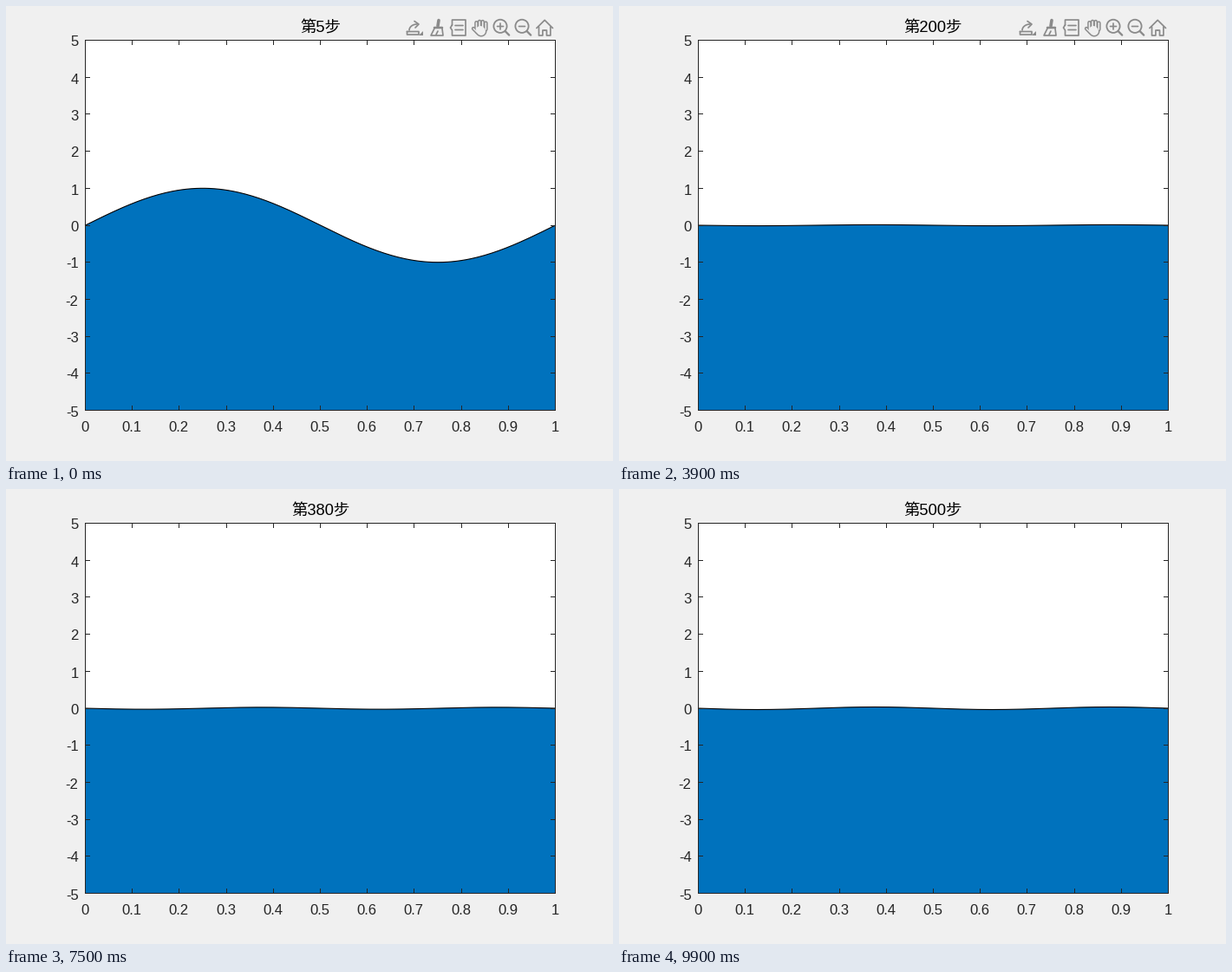
These frames come from a looping animation (700 by 525 pixels, 10 s). A matplotlib script:

```python
import numpy as np
import matplotlib.pyplot as plt
from matplotlib.animation import FuncAnimation
from matplotlib.patches import Circle, Polygon, Rectangle

W, H, DPI = 700, 525, 100
LEFT, RIGHT, TOP, BOTTOM = 91.5, 633.5, 39.5, 466.5
FRAMES, INTERVAL, STEP = 100, 100, 5
TOOLBAR_END = 68
DRIFT = 7e-5  # growth of the second harmonic per step
PX = 72 / DPI
BACK, INK, TOOL, BLUE = "#F0F0F0", "#262626", "#8A8A8A", "#0072BD"

plt.rcParams["font.family"] = ["Liberation Sans", "Noto Sans CJK JP"]
fig = plt.figure(figsize=(W / DPI, H / DPI), dpi=DPI, facecolor=BACK)
ax = fig.add_axes([0, 0, 1, 1])
ax.set_xlim(0, W)
ax.set_ylim(H, 0)
ax.axis("off")


def px(u):
    return LEFT + (RIGHT - LEFT) * u


def py(v):
    return BOTTOM - (BOTTOM - TOP) * (v + 5) / 10


def center(c):
    """Middle of the pixel that holds c, so thin lines stay crisp."""
    return np.floor(c) + 0.5


def line(xs, ys, color=INK, width=1.0, z=4, **kw):
    return ax.plot(xs, ys, color=color, lw=width * PX, zorder=z,
                   snap=False, **kw)[0]


def label(x, y, text, size=16.67, color=INK, ha="center"):
    return ax.text(x, y, text, fontsize=size * PX, color=color, ha=ha,
                   va="baseline", zorder=5)


def draw_axes():
    ax.add_patch(Rectangle((LEFT, TOP), RIGHT - LEFT, BOTTOM - TOP,
                           fc="white", ec="none", snap=False, zorder=1))
    for y in (TOP, BOTTOM):
        line([LEFT, RIGHT], [y, y], solid_capstyle="projecting")
    for x in (LEFT, RIGHT):
        line([x, x], [TOP, BOTTOM], solid_capstyle="projecting")
    for i in range(11):
        x, y = center(px(i / 10)), center(py(i - 5))
        for end, d in ((TOP, 5.5), (BOTTOM, -5.5)):
            line([x, x], [end, end + d], solid_capstyle="butt")
        for end, d in ((LEFT, 5.5), (RIGHT, -5.5)):
            line([end, end + d], [y, y], solid_capstyle="butt")
        label(x - 0.5, 491, f"{i / 10:g}")
        label(83.5, y + 7, str(i - 5), ha="right")


def stroke(*pts, width=1.7, color=TOOL, z=6):
    xs, ys = zip(*pts)
    return line(xs, ys, color, width, z, solid_joinstyle="round",
                solid_capstyle="round")


def frame(x0, y0, x1, y1):
    return stroke((x0, y0), (x1, y0), (x1, y1), (x0, y1), (x0, y0))


def outlined(a, b, width):
    """Capsule outline; overlapping capsules merge into one shape."""
    return [stroke(a, b, width=width),
            stroke(a, b, width=width - 3, color=BACK, z=7)]


def export_icon(x):
    t = np.linspace(0, np.pi / 2, 12)
    arc = zip(x - 6 + 9 * (1 - np.cos(t)), 28 - 7 * np.sin(t))
    corner = Polygon([(x + 10, 29), (x + 10, 34), (x + 5, 34)],
                     fc=TOOL, ec="none", zorder=6)
    return [stroke(*arc), frame(x - 8.5, 29.5, x + 5, 33),
            stroke((x, 17.5), (x + 5, 21), (x + 1, 25)),
            ax.add_patch(corner)]


def brush_icon(x):
    return [stroke((x + 1, 16.5), (x, 23), width=3.6),
            stroke((x - 4, 25), (x + 5, 25), width=2.6),
            stroke((x - 4, 26), (x - 8, 34), (x + 6, 34), (x + 5, 26)),
            stroke((x - 2, 33), (x, 29))]


def tip_icon(x):
    lines = [stroke((x - 4, y), (x + 5, y)) for y in (22.5, 27.5)]
    box = stroke((x - 7.5, 22), (x - 7.5, 16), (x + 8, 16), (x + 8, 34),
                 (x - 7.5, 34), (x - 7.5, 28), (x - 9.5, 25), (x - 7.5, 22))
    return [box, *lines]


def hand_icon(x):
    parts = outlined((x, 28), (x + 1, 29), 13)
    parts += outlined((x - 8, 26), (x - 4, 30), 4.4)
    for i in range(4):
        fx = x - 4.5 + 3.6 * i
        parts += outlined((fx, 17.8 + 0.7 * (i - 1.4) ** 2), (fx, 27), 4.6)
    return parts


def zoom_icon(x, plus):
    ring = Circle((x, 23.3), 7.6, fill=False, ec=TOOL, lw=1.8 * PX, zorder=6)
    parts = [ax.add_patch(ring),
             stroke((x + 5.6, 29), (x + 10.2, 33.6), width=2.3),
             stroke((x - 3.5, 23.5), (x + 3.5, 23.5))]
    if plus:
        parts.append(stroke((x, 20), (x, 27)))
    return parts


def home_icon(x):
    parts = [stroke((x - 9.3, 25.5), (x, 16.3), (x + 9.3, 25.5))]
    for side in (-1, 1):
        parts.append(stroke((x + 6.7 * side, 24), (x + 6.7 * side, 34),
                            (x + 2.3 * side, 34), (x + 2.3 * side, 28),
                            (x, 28)))
    return parts


draw_axes()
tools = (export_icon(471) + brush_icon(498) + tip_icon(522) + hand_icon(547)
         + zoom_icon(570, True) + zoom_icon(595, False) + home_icon(621.2))
title = label(362.5, 31, "", 18.33, "black")
u = np.linspace(0, 1, 201)
xs = px(u)
water = ax.add_patch(Polygon([(0, 0), (1, 1)], fc=BLUE, ec="none",
                             snap=False, zorder=2))
surface = line([], [], "black", 1.1, 3)


def wave(n):
    """Standing wave whose second harmonic slowly falls out of phase."""
    first = np.sin(np.pi * n / 10) * np.sin(2 * np.pi * u)
    second = -DRIFT * n * np.cos(np.pi * n / 5) * np.sin(4 * np.pi * u)
    return first + second


def update(k):
    n = STEP * (k + 1)
    ys = py(wave(n))
    water.set_xy([(LEFT, BOTTOM), *zip(xs, ys), (RIGHT, BOTTOM)])
    surface.set_data(xs, ys)
    title.set_text(f"第{n}步")
    for part in tools:
        part.set_visible(k < TOOLBAR_END)
    return [water, surface, title, *tools]


anim = FuncAnimation(fig, update, frames=FRAMES, interval=INTERVAL,
                     repeat=True, repeat_delay=0, blit=False)
plt.show()
```
